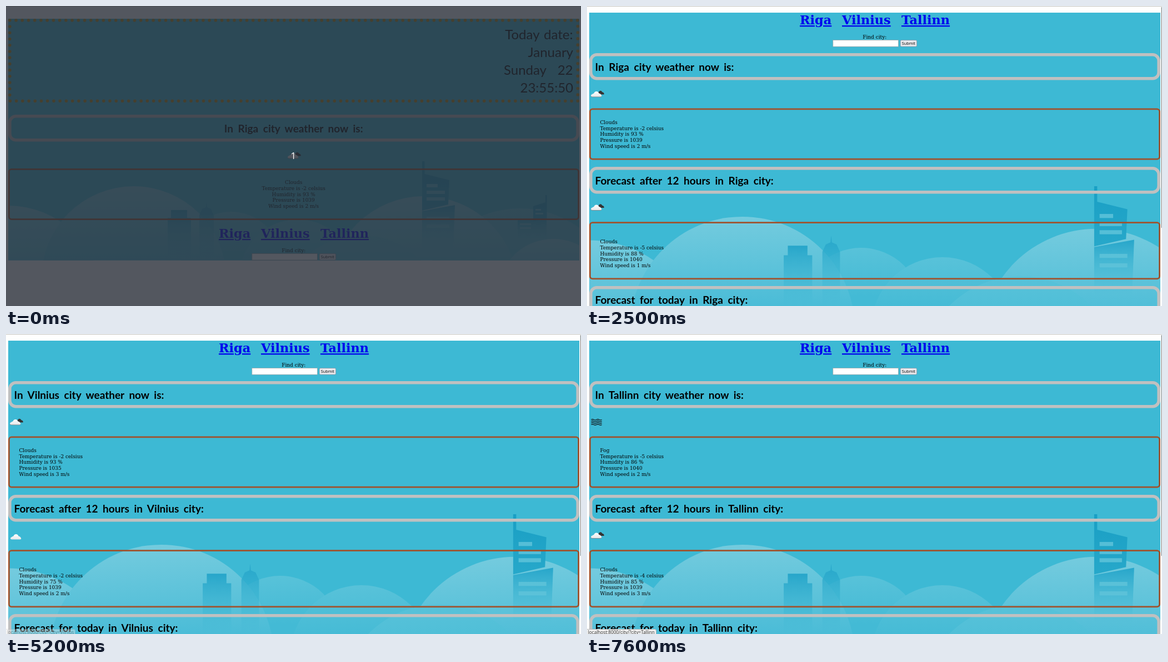
An HTML page for the animation above (8 s loop, 1035 by 541 pixels).

```html
<!DOCTYPE html>
<html lang="en">
<head>
<meta charset="utf-8">
<title>City weather</title>
<style>
  html, body { margin: 0; width: 100%; height: 100%; overflow: hidden; background: #fffffe; }
  svg { display: block; width: 1035px; height: 541px; }
  text { font: 8.97px "DejaVu Serif", serif; white-space: pre; }
  .nav { font-size: 22.4px; font-weight: bold; fill: #00e; text-decoration: underline; }
  .title { font: bold 19px Lato, sans-serif; word-spacing: 4px; }
  .date { font: 24px Lato, sans-serif; word-spacing: 2px; text-anchor: end; }
  .button { font: 7.3px "Open Sans", sans-serif; }
  .status { font: 8.2px "Open Sans", sans-serif; fill: #333; }
  .count { font: 16.5px "Open Sans", sans-serif; fill: #fff; }
  .mid { text-anchor: middle; }
</style>
</head>
<body>
<svg id="stage" viewBox="0 0 1035 541"></svg>
<script>
const stage = document.getElementById('stage');
const CENTER = 517.7;

const rect = (x, y, w, h, fill, extra = '') =>
  `<rect x="${x}" y="${y}" width="${w}" height="${h}" fill="${fill}" ${extra}/>`;
const text = (x, y, str, cls = '') => `<text x="${x}" y="${y}" class="${cls}">${str}</text>`;
const path = (d, fill, extra = '') => `<path d="${d}" fill="${fill}" ${extra}/>`;
const fade = (id, top, bottom, end, opacity = 1) =>
  `<linearGradient id="${id}" x2="0" y2="1"><stop stop-color="${top}"/>
   <stop offset="${end}" stop-color="${bottom}" stop-opacity="${opacity}"/></linearGradient>`;

const defs = '<defs>' +
  fade('hill', '#74cbde', '#45bad6', .45) +
  fade('haze', '#58c2d9', '#43bad5', .4) +
  fade('block', '#27a6ca', '#3db9d4', 1, 0) +
  fade('tower', '#199fc4', '#27a8ca', 1) +
  fade('cloud', '#fff', '#e6e8ea', 1) + '</defs>';

function skyline() {
  const hill = (x, y, r, fill = 'hill') => `<circle cx="${x}" cy="${y}" r="${r}" fill="url(#${fill})"/>`;
  const bar = (x, y, w, h = 6) => rect(x, y, w, h, '#5fc3da', 'opacity=".85"');
  return hill(925, 545, 180, 'haze') + hill(405, 461, 90, 'haze') + hill(525, 490, 105, 'haze') +
    hill(4, 528, 168) + hill(230, 491, 166) + hill(752, 513, 170) +
    hill(640, 560, 147, 'haze') + hill(985, 520, 100) +
    path('M291 458V382H297V368H326V382H333V458Z', 'url(#block)') +
    path('M348 458V377L353 366 360 363 361 353 362 363 369 366 374 377V458Z', 'url(#block)') +
    path('M749 280H753.500V303L798 314 796 358 749 369Z', 'url(#tower)') +
    path('M749 370 808 359 805 440H749Z', 'url(#block)') +
    bar(757, 321, 20) + bar(757, 333, 33) + bar(757, 345, 33) + bar(757, 380, 41) + bar(757, 394, 41) +
    path('M949 361 971 354V341H973.500V384L949 388Z', 'url(#tower)') +
    path('M921 386 973 381V424H921Z', 'url(#block)') +
    bar(953, 366, 10, 3) + bar(953, 373, 14, 3) + bar(925, 392, 20, 3) + bar(925, 399, 20, 3);
}

const page = (top, height, transform) => rect(4, top, 1028, height, '#3db9d4') +
  `<clipPath id="page">${rect(4, top, 1028, height, '#000')}</clipPath>
   <g clip-path="url(#page)"><g transform="${transform}">${skyline()}</g></g>`;

const frame = (y, h, stroke, width, radius) =>
  rect(4 + width / 2, y + width / 2, 1028 - width, h - width, 'none',
    `rx="${radius}" stroke="${stroke}" stroke-width="${width}"`);

const titleBox = (y, str, centered) => frame(y, 48.5, '#c0c0c0', 5.6, 11) +
  text(centered ? CENTER : 14.5, y + 32, str, centered ? 'title mid' : 'title');

function report(y, [sky, temp, humidity, pressure, wind], centered) {
  const lines = [sky, `Temperature is ${temp} celsius`, `Humidity is ${humidity} %`,
    `Pressure is ${pressure}`, `Wind speed is ${wind} m/s`];
  return lines.map((line, i) =>
    text(centered ? CENTER : 23.5, y + i * 10.67, line, centered ? 'mid' : '')).join('');
}

const infoBox = (y, h) => frame(y, h, '#a0522d', 2.8, 4.5);

const CLOUD = 'M2.500 10.500Q0 10.500 0 8.500 0 6.500 2.500 6 4 4.500 5.500 4.500 6.500 1 10 1 13.500 1 14.500 4.500 18 5 19 8 20 10.500 17 10.500Z';
const icons = {
  cloud: path(CLOUD, 'url(#cloud)', 'transform="translate(1 3)"'),
  clouds: path(CLOUD, '#333', 'transform="translate(10 -.5) scale(.72)"') +
    path(CLOUD, '#8a7f80', 'transform="translate(0 1.2)"') + path(CLOUD, 'url(#cloud)', 'transform="translate(0 .5)"'),
  fog: [2, 5, 8, 11].map(y => path(`M.5 ${y}q2.400-1.500 4.800 0t4.800 0 4.800 0 4.800 0`, 'none',
    'stroke="#16242a" stroke-width="1.4"')).join('')
};
const icon = (x, y, name) => `<g transform="translate(${x} ${y})">${icons[name]}</g>`;

const search = (y, hover) => text(383, y, 'Riga', 'nav') + text(459, y, 'Vilnius', 'nav') +
  text(566, y, 'Tallinn', 'nav') + text(CENTER, y + 25.700, 'Find city:', 'mid') +
  rect(442.8, y + 28.400, 117.700, 11.800, '#fff', `stroke="${hover ? '#555' : '#96a4a8'}" stroke-width=".8"`) +
  rect(564.2, y + 28.700, 29.400, 11.400, '#e9e9ed', 'rx="1.8" stroke="#8f8f9d" stroke-width=".7"') +
  text(578.8, y + 37, 'Submit', 'button mid');

const home = () => page(23, 435.5, '') +
  rect(6.8, 25.8, 1022.4, 145.4, 'none',
    'pathLength="208" stroke="#b8860b" stroke-width="5.6" stroke-linecap="round" stroke-dasharray="0 1"') +
  text(1020.5, 60, 'Today date:', 'date') + text(1021, 92, 'January', 'date') +
  text(973, 124, 'Sunday', 'date') + text(1020.5, 124, '22', 'date') + text(1021, 156, '23:55:50', 'date') +
  titleBox(196, 'In Riga city weather now is:', true) + icon(507, 263.5, 'clouds') +
  infoBox(293, 93) + report(321.3, cities.Riga.now, true) + search(418);

const cities = {
  Riga: { icons: ['clouds', 'clouds'], now: ['Clouds', -2, 93, 1039, 2], later: ['Clouds', -5, 88, 1040, 1] },
  Vilnius: { icons: ['clouds', 'cloud'], now: ['Clouds', -2, 93, 1035, 3], later: ['Clouds', -2, 75, 1039, 2] },
  Tallinn: { icons: ['fog', 'clouds'], now: ['Fog', -5, 86, 1040, 2], later: ['Clouds', -4, 85, 1039, 3] }
};

function forecast(name, hover) {
  const city = cities[name];
  return page(12, 529, 'matrix(1.22 0 0 1.22 -.88 -16.6)') + search(33, hover) +
    titleBox(85, `In ${name} city weather now is:`) + icon(7, 152.5, city.icons[0]) +
    infoBox(184.5, 93) + report(213, city.now) +
    titleBox(290, `Forecast after 12 hours in ${name} city:`) + icon(7, 357, city.icons[1]) +
    infoBox(389.2, 104) + report(428.2, city.later) +
    titleBox(505, `Forecast for today in ${name} city:`) +
    rect(1033.7, 2, 1.3, 398, '#8f9496');
}

function status(target, opacity) {
  const loading = target === 'loading';
  const label = loading ? 'localhost' : `localhost:8000/city/?city=${target}`;
  const width = loading ? 38 : target === 'Riga' ? 116 : 125;
  return `<g opacity="${opacity}">` +
    rect(-3, 532.5, width + 2.5, 14, '#f0f0f0', 'rx="2.5" stroke="#b4b4b4" stroke-width=".9"') +
    text(1.8, 541, label, 'status') + '</g>';
}

const countdown = () => rect(0, 0, 1035, 541, 'rgb(41,45,56)', 'opacity=".8"') +
  text(CENTER - .5, 276, '1', 'count mid');

// Each step: start time, shown city (empty = home), hovered link, status opacity
const steps = [
  [0, '', '', 0],
  [1700, '', 'Riga', .35],
  [1800, '', 'Riga', .75],
  [1900, '', 'Riga', 1],
  [2500, 'Riga', '', 0],
  [4200, 'Riga', 'Vilnius', .9],
  [4400, 'Riga', 'Vilnius', 1],
  [5000, 'Riga', 'loading', 1],
  [5100, 'Vilnius', 'loading', 1],
  [5200, 'Vilnius', 'Vilnius', .4],
  [5300, 'Vilnius', 'Vilnius', .8],
  [5400, 'Vilnius', 'Vilnius', 1],
  [6300, 'Vilnius', 'Tallinn', 1],
  [7500, 'Tallinn', 'Tallinn', 1]
];

let shown = '';
function draw(now) {
  const t = now % 8000;
  const step = steps.findLast(([start]) => t >= start);
  const [, city, target, opacity] = step;
  const hover = t >= 3600 && t < 3700;
  const counting = t < 100;
  const key = [step, hover, counting].join();
  if (key !== shown) {
    shown = key;
    stage.innerHTML = defs + rect(0, 0, 1035, 541, '#fffffe') + rect(0, 0, 1035, 1, '#c4c4c0') +
      (city ? forecast(city, hover) : home()) +
      (target ? status(target, opacity) : '') + (counting ? countdown() : '');
  }
}

const began = performance.now();
function tick() {
  draw(performance.now() - began);
  requestAnimationFrame(tick);
}
tick();
</script>
</body>
</html>
```
